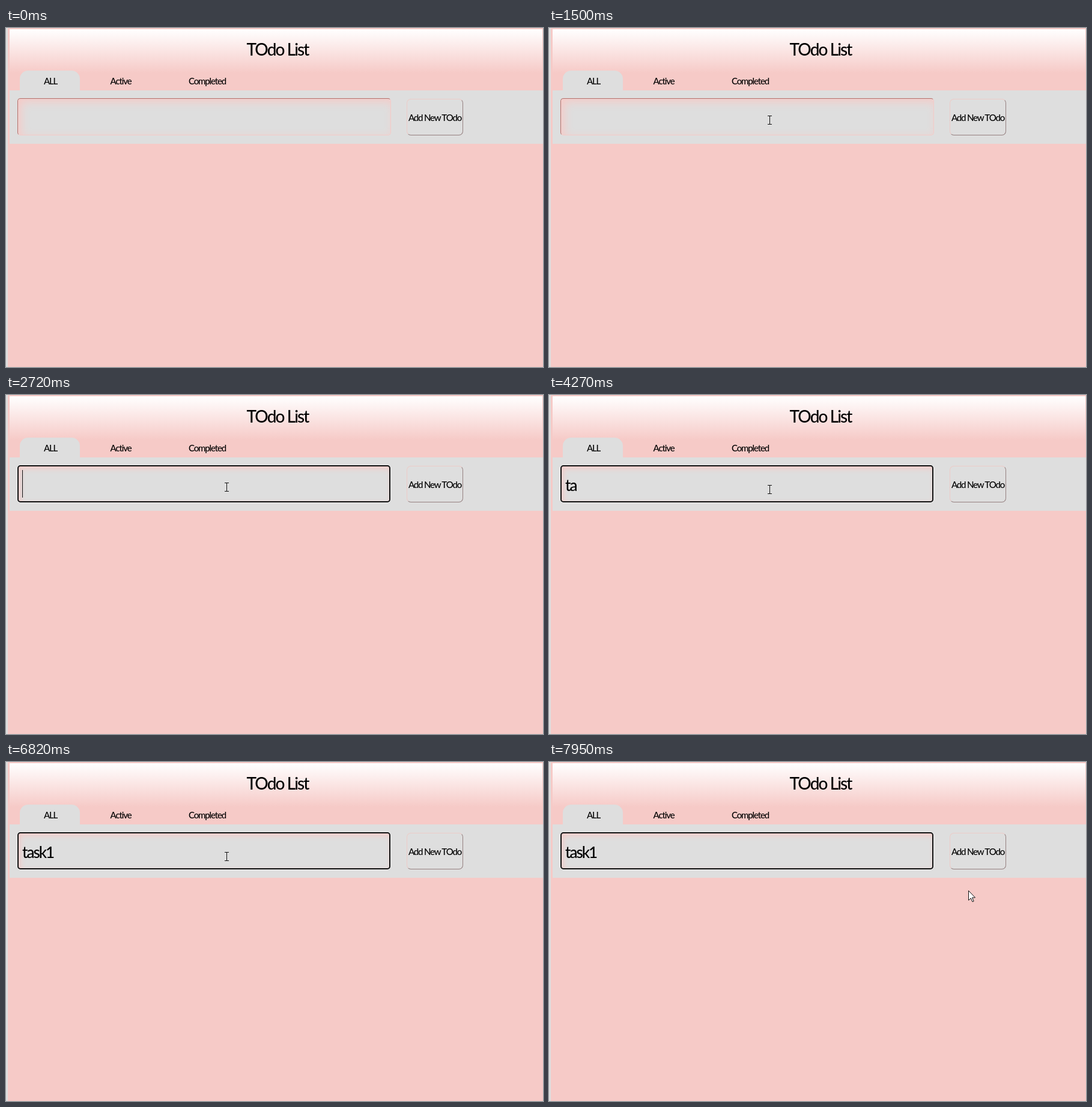
Write an HTML page that moves like this. It is 894 by 565 pixels and loops after 8 s.

```html
<!DOCTYPE html>
<html lang="en">
<head>
<meta charset="utf-8">
<title>TOdo List</title>
<style>
  html, body { margin: 0; width: 100%; height: 100%; overflow: hidden; background: #f6cac7; }
  div, svg { position: absolute; box-sizing: border-box; }
  .edge { left: 0; top: 0; width: 3px; height: 565px; background: #dedede; }
  .header { left: 6px; top: 2px; width: 887px; height: 73px; background: linear-gradient(#fff, #f6cac7); }
  .tab { left: 23px; top: 71px; width: 100px; height: 34px; border-radius: 14px 14px 0 0; background: #dedede; }
  .panel { left: 6px; top: 104px; width: 888px; height: 89px; background: #dedede; }
  .field {
    left: 19px; top: 117px; width: 622px; height: 62px; border-radius: 5px;
    border: 1px solid; border-color: #b5706b #f3cbc8 #f3cbc8 #b5706b;
    box-shadow: inset 5px 5px 15px #f6cac7;
  }
  .field.focused {
    width: 621px; border: 2px solid #101010;
    box-shadow: inset 3px 4px 10px #f3cbc8, 0 0 0 1px #ededed;
  }
  .button {
    left: 667px; top: 118px; width: 94px; height: 61px; border-radius: 7px;
    border: 1px solid; border-color: #eccbc8 #958080 #958080 #eccbc8;
  }
  svg { left: 0; top: 0; }
  text { font-family: Lato, "Open Sans", sans-serif; font-weight: 500; fill: #000; }
  .label { font-size: 15px; letter-spacing: -1.15px; text-anchor: middle; }
  .title { font-size: 28px; letter-spacing: -1.9px; text-anchor: middle; }
  .typed { font-size: 26px; letter-spacing: -2px; }
</style>
</head>
<body>
<div class="edge"></div>
<div class="header"></div>
<div class="tab"></div>
<div class="panel"></div>
<div class="field" id="field"></div>
<div class="button"></div>
<svg width="894" height="565">
  <text class="title" x="452" y="45.5">TOdo List</text>
  <text class="label" x="74" y="93.5">ALL</text>
  <text class="label" x="191" y="93.5">Active</text>
  <text class="label" x="335" y="93.5">Completed</text>
  <text class="label" x="714" y="154.5">Add New TOdo</text>
  <text class="typed" id="typed" x="27" y="160"></text>
  <rect id="caret" y="125" width="1" height="46" fill="#111"/>
  <path id="arrow" d="M.5.5V16.5L4.2 13L7 19L9.2 18L6.5 12H11.5Z" fill="#fff" stroke="#111"/>
  <path id="beam" d="M-3-7H3M0-7V7M-3 7H3" fill="none" stroke="#111" stroke-linecap="square"/>
</svg>
<script>
const LOOP = 8000;
const APPEAR = 580;
const FOCUS = 1740;
const BLINK = 490;
const WORD = "task1";
const KEY_TIMES = [3610, 3780, 5100, 5670, 6250];

const el = id => document.getElementById(id);
const field = el("field"), typed = el("typed"), caret = el("caret");
const arrow = el("arrow"), beam = el("beam");
const show = (node, visible) => node.setAttribute("visibility", visible ? "visible" : "hidden");

// The pointer decelerates along a quadratic curve from one rest point to the next.
function glide(t, start, end, from, bend, to) {
  const u = Math.min(1, Math.max(0, (t - start) / (end - start)));
  const e = Math.sin(u * Math.PI / 2);
  return from.map((a, i) => (1 - e) ** 2 * a + 2 * e * (1 - e) * bend[i] + e ** 2 * to[i]);
}

function pointerAt(t) {
  const entry = [552, 16], click = [367, 153], rest = [367, 157], exit = [698, 214];
  if (t < 3300) return glide(t, 970, 1500, entry, [395, 111], click);
  if (t < 7570) return glide(t, 3300, 3370, click, click, rest);
  return glide(t, 7570, 7950, rest, [520, 175], exit);
}

function drawPointer(t) {
  const [x, y] = pointerAt(t).map(Math.round);
  const visible = t >= APPEAR;
  const inField = x > 19 && x < 641 && y > 117 && y < 179;
  show(arrow, visible && !inField);
  show(beam, visible && inField);
  arrow.setAttribute("transform", `translate(${x} ${y})`);
  beam.setAttribute("transform", `translate(${x + .5} ${y + .5})`);
}

function drawField(t) {
  const focused = t >= FOCUS;
  const keys = KEY_TIMES.filter(time => time <= t);
  field.classList.toggle("focused", focused);
  typed.textContent = WORD.slice(0, keys.length);

  // Every key press restarts the caret's blink.
  const lastInput = keys.at(-1) ?? FOCUS;
  const lit = Math.floor((t - lastInput) / BLINK) % 2 === 0;
  const textWidth = keys.length ? typed.getComputedTextLength() : 0;
  caret.setAttribute("x", Math.round(27 + textWidth));
  show(caret, focused && lit);
}

function tick() {
  const t = performance.now() % LOOP;
  drawPointer(t);
  drawField(t);
  requestAnimationFrame(tick);
}
tick();
</script>
</body>
</html>
```
